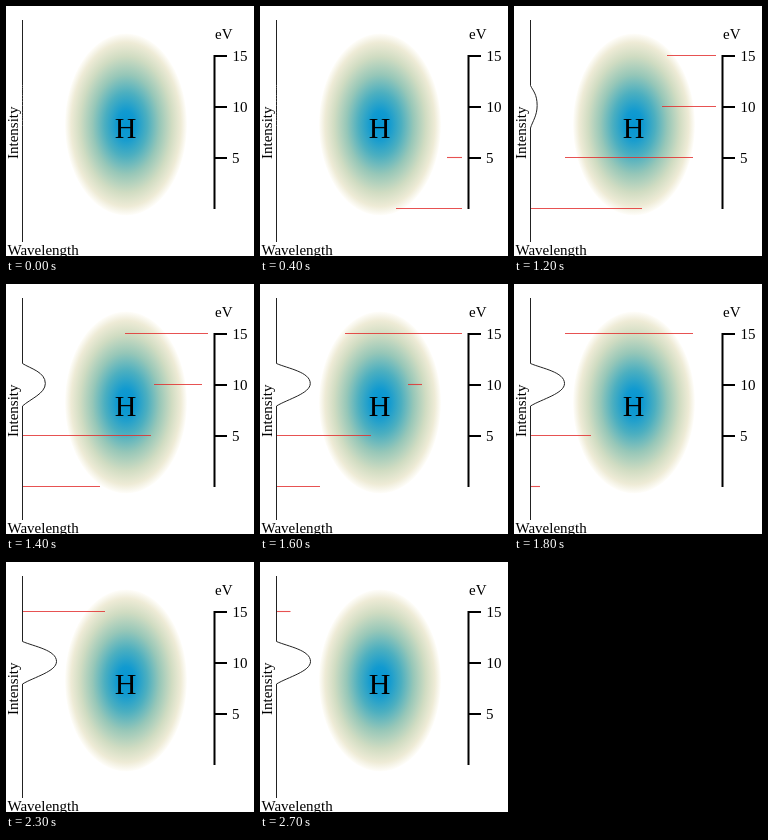
Animation of 248 by 250 pixels, one loop 2.8 s. Source, as an HTML page with a canvas:

```html
<!DOCTYPE html>
<html lang="en">
<head>
<meta charset="utf-8">
<title>Absorption by hydrogen</title>
<style>
html, body { margin: 0; width: 100%; height: 100%; overflow: hidden; background: #fff; }
canvas { display: block; }
</style>
</head>
<body>
<canvas id="stage" width="248" height="250"></canvas>
<script>
const ctx = document.getElementById('stage').getContext('2d');
const STEP_MS = 100, STEPS = 28;
const AXIS_X = 16, ENTRY_X = 202, ABSORB_X = 148;
const RAY_LENGTH = 128, SPEED = 17;

// delay: step at which the ray's head is just about to enter
const rays = [
  { y: 202, delay: 0 },
  { y: 151, delay: 3 },
  { y: 100, delay: 6, stop: ABSORB_X },
  { y: 49, delay: 9, tail: [[18, 179], [23, 99], [24, 76], [27, 30.5]] }
];

const clamp = (v, lo, hi) => Math.min(hi, Math.max(lo, v));

function smoothstep(a, b, v) {
  const t = clamp((v - a) / (b - a), 0, 1);
  return t * t * (3 - 2 * t);
}

function follow(points, step) {
  const i = Math.max(1, points.findIndex(p => p[0] >= step));
  const [s0, x0] = points[i - 1], [s1, x1] = points[i];
  return x0 + (x1 - x0) * (step - s0) / (s1 - s0);
}

function strokePath(color, width, trace) {
  ctx.strokeStyle = color;
  ctx.lineWidth = width;
  ctx.beginPath();
  trace();
  ctx.stroke();
}

function segment(x0, y0, x1, y1) {
  ctx.moveTo(x0, y0);
  ctx.lineTo(x1, y1);
}

function label(text, x, y, size = 15, align = 'left') {
  ctx.font = `${size}px "Liberation Serif", "Times New Roman", serif`;
  ctx.textAlign = align;
  ctx.fillStyle = '#000';
  ctx.fillText(text, x, y);
}

function drawAtom() {
  const glow = ctx.createRadialGradient(0, 0, 0, 0, 0, 1);
  const stops = [
    [0, '#0495d2'], [0.15, '#119ad0'], [0.35, '#4cafc0'], [0.55, '#97c7b8'],
    [0.75, '#d0dcc2'], [0.9, '#eeebd6'], [1, '#fffefb']
  ];
  stops.forEach(([at, color]) => glow.addColorStop(at, color));
  ctx.save();
  ctx.translate(120, 118.5);
  ctx.scale(61, 91);
  ctx.fillStyle = glow;
  ctx.beginPath();
  ctx.arc(0, 0, 1, 0, Math.PI * 2);
  ctx.fill();
  ctx.restore();
}

function drawScale() {
  strokePath('#000', 2, () => {
    segment(208.5, 49, 208.5, 203);
    [50, 101, 152].forEach(y => segment(208, y, 221, y));
  });
  label('eV', 209, 33);
  label('15', 226.5, 55);
  label('10', 226.5, 106);
  label('5', 226, 157);
}

function drawRay({ y, delay, stop = AXIS_X, tail }, step) {
  const head = 204 - SPEED * (step - delay);
  const end = tail && step >= tail[0][0] ? follow(tail, step) : head + RAY_LENGTH;
  const left = Math.max(stop, head), right = Math.min(ENTRY_X, end);
  if (right <= left) return;
  strokePath('rgba(226, 44, 44, 0.82)', 1.1, () => segment(left, y + 0.5, right, y + 0.5));
}

function drawSpectrum(step) {
  const height = 34 * smoothstep(10.3, 16.3, step);
  const x = AXIS_X + 0.5;
  strokePath('#222', 1, () => {
    ctx.moveTo(x, 14);
    ctx.lineTo(x, 79.5);
    ctx.bezierCurveTo(x + height * 0.34, 84.5, x + height, 88, x + height, 99.5);
    ctx.bezierCurveTo(x + height, 109.5, x + height * 0.34, 115, x, 122);
    ctx.lineTo(x, 236);
  });
}

function drawLabels() {
  label('H', 119.5, 132, 30, 'center');
  label('Wavelength', 1.5, 249);
  ctx.save();
  ctx.translate(12, 153);
  ctx.rotate(-Math.PI / 2);
  label('Intensity', 0, 0);
  ctx.restore();
}

function draw(step) {
  ctx.fillStyle = '#fff';
  ctx.fillRect(0, 0, 248, 250);
  drawAtom();
  rays.forEach(ray => drawRay(ray, step));
  drawSpectrum(step);
  drawScale();
  drawLabels();
}

let start;
function tick(now) {
  start ??= now;
  draw(Math.floor((now - start) / STEP_MS) % STEPS);
  requestAnimationFrame(tick);
}
draw(0);
requestAnimationFrame(tick);
</script>
</body>
</html>
```
